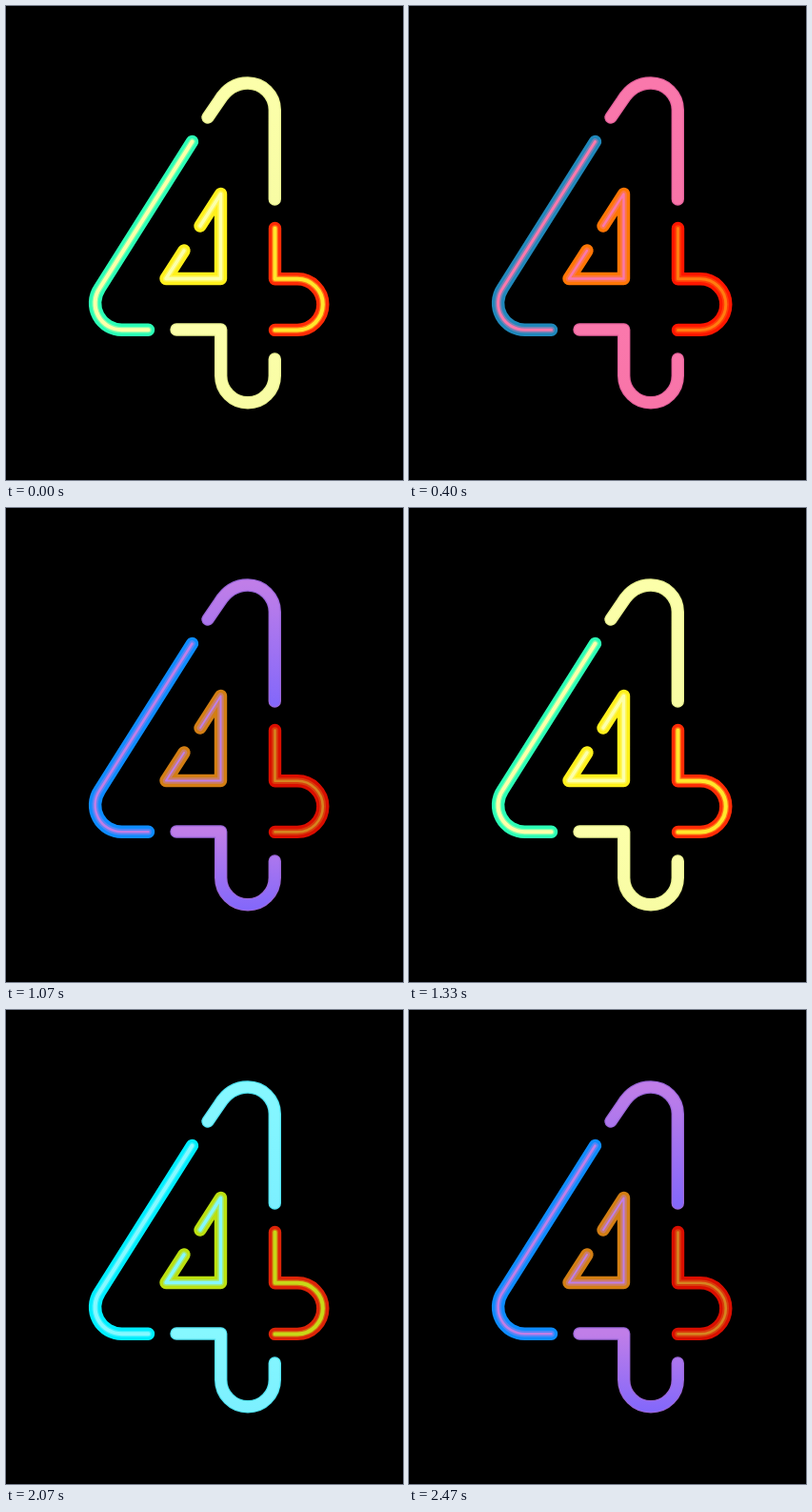
These frames come from a looping animation (417x498 px, 2.54 s). An HTML page:

```html
<!DOCTYPE html>
<html lang="en">
<head>
<meta charset="utf-8">
<title>Neon four</title>
<style>
  html, body { margin: 0; width: 100%; height: 100%; overflow: hidden; background: #000; }
  svg { display: block; width: 100%; height: 100%; }
  path { fill: none; stroke-linecap: round; stroke-linejoin: round; }
</style>
</head>
<body>
<svg id="sign" viewBox="0 0 417 498">
  <defs>
    <linearGradient id="upper" gradientUnits="userSpaceOnUse" x1="0" y1="80" x2="0" y2="205">
      <stop offset="0"/><stop offset="1"/>
    </linearGradient>
    <linearGradient id="lower" gradientUnits="userSpaceOnUse" x1="0" y1="340" x2="0" y2="420">
      <stop offset="0"/><stop offset="1"/>
    </linearGradient>
  </defs>
</svg>
<script>
const LOOP = 2540;
const sign = document.getElementById('sign');
const stops = [...sign.querySelectorAll('stop')];

const shapes = {
  top: 'M212 117L224 99.5C231 88 241 81 254 81A28.3 28.3 0 0 1 282.3 109V203',
  bottom: 'M179 340H225.7V388.5A28.3 28.3 0 0 0 282.3 388.5V371',
  left: 'M195.5 142.5L98.4 296.5A28 28 0 0 0 122 340.2H149.5',
  inner: 'M204 231L225.5 197.5V286.5H168L187 257',
  right: 'M282.5 233.5V286.8H306A26.8 26.8 0 0 1 306 340.4H282.5'
};

// main: tube colour from start to end of the gradient; core: width of the bright line
const yellow = { main: ['#fcffaa', '#f8fca4'], edge: '#e8f090', left: '#2cffb6', inner: '#fff01c', right: '#ff2c06', hot: '#ffe62c', core: 4 };
const pink   = { main: ['#fa78ac', '#f874a8'], edge: '#e4609a', left: '#2088bb', inner: '#ff7605', right: '#ff1600', hot: '#ff7c10', core: 3 };
const cyan   = { main: ['#86f8ff', '#7cf0ff'], edge: '#50e2f2', left: '#00eeff', inner: '#bbe010', right: '#dc2408', hot: '#c8d818', core: 4 };
const purple = { main: ['#c07ee8', '#8468fa'], edge: '#9a66d8', left: '#0e8cff', inner: '#d27e14', right: '#da0e00', hot: '#d68420', core: 2.6 };

const cues = [
  [0, yellow], [330, pink], [670, cyan], [1070, purple],
  [1330, yellow], [1670, pink], [2070, cyan], [2330, purple]
];

function line(d, width, opacity = 1) {
  const path = document.createElementNS('http://www.w3.org/2000/svg', 'path');
  path.setAttribute('d', d);
  path.setAttribute('stroke-width', width);
  path.setAttribute('stroke-opacity', opacity);
  return sign.appendChild(path);
}

const tubes = {};
for (const [name, d] of Object.entries(shapes)) {
  const solid = name === 'top' || name === 'bottom';
  tubes[name] = {
    outer: line(d, 13.4),
    glow: line(d, solid ? 11 : 6.5, solid ? 1 : 0.4),
    core: line(d, 3)
  };
}

function paint(name, outer, glow, core, width) {
  const tube = tubes[name];
  tube.outer.setAttribute('stroke', outer);
  tube.glow.setAttribute('stroke', glow);
  tube.core.setAttribute('stroke', core);
  tube.core.setAttribute('stroke-width', width);
}

let shown;
function render(time) {
  const look = cues.findLast(([start]) => start <= time)[1];
  if (look === shown) return;
  shown = look;
  stops.forEach((stop, i) => stop.setAttribute('stop-color', look.main[i % 2]));
  const light = look.main[0];
  paint('top', look.edge, 'url(#upper)', 'url(#upper)', 3);
  paint('bottom', look.edge, 'url(#lower)', 'url(#lower)', 3);
  paint('left', look.left, light, light, look.core);
  paint('inner', look.inner, light, light, look.core - 0.6);
  paint('right', look.right, look.hot, look.hot, look.core);
}

const begin = performance.now();
function tick() {
  render((performance.now() - begin) % LOOP);
  requestAnimationFrame(tick);
}
tick();
</script>
</body>
</html>
```
